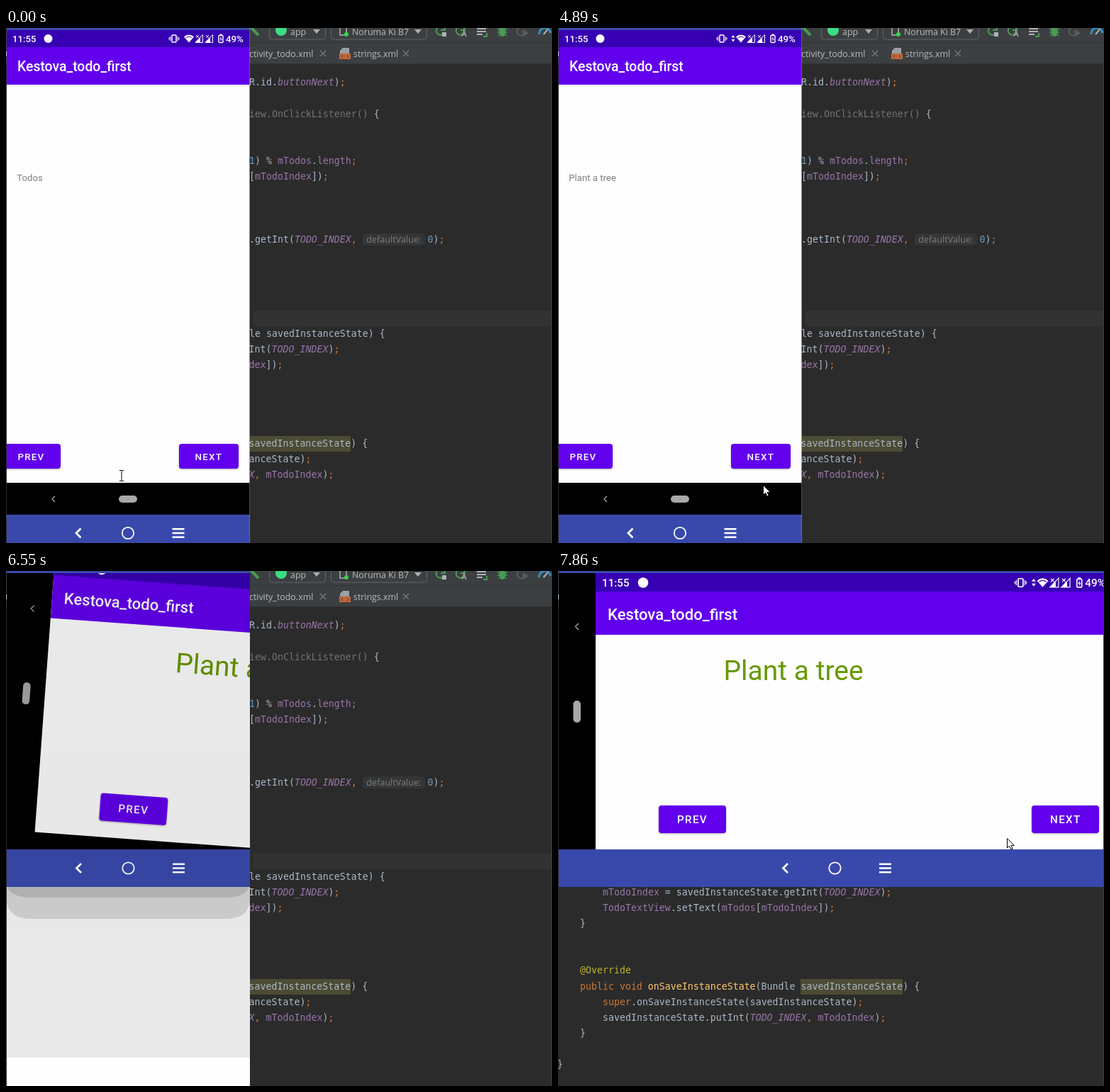
Recreate the animation shown at these times as an HTML page. Size 770 by 727 pixels, loop 8000 ms.

```html
<!DOCTYPE html>
<html lang="en">
<head>
<meta charset="utf-8">
<title>Todo app demo</title>
<style>
html, body { margin: 0; width: 100%; height: 100%; overflow: hidden; background: #2b2b2b; }
svg { display: block; width: 770px; height: 727px; }
text { white-space: pre; }
.code { font: 13.27px "DejaVu Sans Mono", monospace; fill: #a9b7c6; }
.ui { font: 12.4px "Open Sans", sans-serif; fill: #bbb; }
.app { font-family: Roboto, sans-serif; }
.m { font-weight: 500; }
.mono { font: 17.7px "Liberation Mono", monospace; fill: #fff; text-anchor: middle; }
.p { fill: #9876aa; } .o { fill: #cc7832; } .b { fill: #6897bb; } .g { fill: #72737a; }
.y { fill: #ffc66d; } .a { fill: #bbb529; } .c { fill: #9876aa; font-style: italic; }
.btn { fill: #6200ee; filter: drop-shadow(0 1px 1px rgba(0,0,0,.35)); }
</style>
</head>
<body>
<svg id="stage" viewBox="0 0 770 727"></svg>
<script>
const LOOP = 8000;
const INDIGO = '#3949ab', PURPLE = '#6200ee', DARK = '#3700b3', GREEN = '#499c54';

const rect = (x, y, w, h, fill, extra = '') =>
  `<rect x="${x}" y="${y}" width="${w}" height="${h}" fill="${fill}" ${extra}/>`;
const path = (d, stroke, width = 1.5, fill = 'none') =>
  `<path d="${d}" stroke="${stroke}" stroke-width="${width}" fill="${fill}"/>`;
const dot = (x, y, r, fill, extra = '') => `<circle cx="${x}" cy="${y}" r="${r}" fill="${fill}" ${extra}/>`;
const label = (x, y, cls, str, size, fill, extra = '') =>
  `<text x="${x}" y="${y}" class="${cls}" ${size ? `font-size="${size}"` : ''} ${fill ? `fill="${fill}"` : ''} ${extra}>${str}</text>`;

// Code lines: row, column, then text with {class|text} spans.
const lines = [
  [0, 43, 'R.id.{c|buttonNext}){o|;}'],
  [2, 43, '{g|iew.OnClickListener()} {'],
  [5, 43, '{b|1}) % {p|mTodos}.{p|length}{o|;}'],
  [6, 43, '[{p|mTodoIndex}]){o|;}'],
  [10, 43, '.getInt({c|TODO_INDEX}{o|,}'],
  [16, 43, 'le savedInstanceState) {'],
  [17, 8, '{p|mTodoIndex} = savedInstanceState.getInt({c|TODO_INDEX}){o|;}'],
  [18, 8, '{p|TodoTextView}.setText({p|mTodos}[{p|mTodoIndex}]){o|;}'],
  [19, 4, '}'],
  [22, 4, '{a|@Override}'],
  [23, 4, '{o|public void} {y|onSaveInstanceState}(Bundle savedInstanceState) {'],
  [24, 8, '{o|super}.onSaveInstanceState(savedInstanceState){o|;}'],
  [25, 8, 'savedInstanceState.putInt({c|TODO_INDEX}{o|,} {p|mTodoIndex}){o|;}'],
  [26, 4, '}'],
  [28, 0, '}']
];
const spans = s => s.replace(/\{(\w)\|([^}]*)\}/g, '<tspan class="$1">$2</tspan>');
const rowY = r => Math.round(81.3 + r * 22.14);

function toolbar() {
  const caret = x => `<path d="M${x} 2h10l-5 6z" fill="#afb1b3"/>`;
  const cross = x => path(`M${x - 4} 32l8 8m0-8l-8 8`, '#777a7c', 1.2);
  const rerun = x => path(`M${x + 9} 8a6 6 0 1 1 1-7m1-4v6h-6`, GREEN, 2);
  return rect(0, 0, 770, 50, '#3c3f41') + rect(0, 20, 770, 1, '#323435') + rect(0, 50, 770, 1, '#323232') +
    path('M344-2l12 12', GREEN, 4) +
    rect(371.5, -10, 79, 26, 'none', 'rx="4" stroke="#626567"') +
    rect(458.5, -10, 135, 26, 'none', 'rx="4" stroke="#626567"') +
    dot(388, 3, 8, '#3ddc84') +
    label(401, 10, 'ui', 'app') + caret(433) +
    path('M471-3v13h9v-13', '#afb1b3', 1.5) + dot(480, 9, 3, '#32d74b') +
    label(488, 10, 'ui', 'Noruma Ki B7') + caret(576) +
    rerun(608) + rect(615, 6, 6, 6, '#afb1b3') +
    rerun(636) + path('M643 12l3-8 3 8m-5-3h4', '#afb1b3', 1.3) +
    path('M664 1h13M664 5h13M664 9h8', '#afb1b3', 2) + path('M678 7v5h-5', GREEN, 2) +
    path('M693 2h14M693 6h14M694 11l12-10M706 11l-12-10', GREEN, 1.4) +
    `<ellipse cx="700" cy="5" rx="4.5" ry="7" fill="${GREEN}"/>` +
    path('M729-1a6 6 0 1 0 0 11', '#5b5e60', 2) + `<path d="M729 2l8 5-8 5z" fill="#5b5e60"/>` +
    path('M752 9a8 8 0 0 1 16-2', '#3592c4', 3) + path('M758 9l6-7', '#afb1b3', 2) +
    label(343, 41, 'ui', 'ctivity_todo.xml') + cross(447) +
    `<path d="M475 28h9v8h-13v-4z" fill="#9aa0a4"/>` + rect(470, 36, 16, 8, '#c2653a') +
    path('M475 38l-2 2 2 2M481 38l2 2-2 2', '#3c3f41', 1) +
    label(490, 41, 'ui', 'strings.xml') + cross(564);
}

function editor() {
  return rect(0, 0, 770, 727, '#2b2b2b') + toolbar() +
    rect(349, 399, 420, 22, '#323232') +
    rect(342, 576, 144, 22, '#4c4b34') +
    rect(503, 290, 88, 17, '#343536', 'rx="4"') +
    label(508, 303, 'ui', 'defaultValue:', 0, 0, 'style="fill:#7c7e80;font-size:12.7px"') +
    lines.map(([r, c, s]) => label(-1 + c * 8, rowY(r), 'code', spans(s))).join('') +
    label(594.5, rowY(10), 'code', spans('{b|0}){o|;}')) +
    rect(769, 0, 1, 727, '#3c3f41') + rect(0, 33, 1, 7, '#c8c8c8');
}

// Status icons, origin at the centre of the wifi fan.
function statusIcons(x, y, scale, id) {
  const signal = sx => path(`M${sx} 5.5L${sx + 10.5}-5.5V5.5z`, '#fff', 1) +
    `<path d="M${sx} 5.5l7-7.3v7.3z" fill="#fff"/>` + path(`M${sx + 1}-5l4 4m0-4l-4 4`, '#fff', 1);
  return `<g transform="translate(${x} ${y}) scale(${scale})">
    <g id="vib${id}">${rect(-30, -5, 6, 10, 'none', 'stroke="#fff" stroke-width="1.5" rx="1"')}
    ${path('M-32.3-3v6M-21.7-3v6M-34-1.5v3M-20-1.5v3', '#fff', 1.1)}</g>
    <g id="data${id}"><path d="M-13.5-1.5l2.5-3.5 2.5 3.5zM-13.5 1h5l-2.5 3.5z" fill="#fff"/></g>
    <path d="M-7-2.5Q0-8.5 7-2.5L0 5.5z" fill="#fff"/>${path('M-4.5-1Q0-4.5 4.5-1', DARK, 1)}
    ${signal(9)}${signal(23)}
    ${rect(42, -4.5, 6, 10, 'none', 'stroke="#fff" stroke-width="1.4" rx="1"')}${rect(43.5, -6.5, 3, 2, '#fff')}
    ${path('M45.5-2l-1.5 2.7h2.2l-1.4 2.6', '#fff', 1)}
    ${label(52, 5, 'app m', '49%', 13.3, '#fff')}</g>`;
}

const button = (x, y, w, h, str, tx, ty, size) =>
  rect(x, y, w, h, PURPLE, 'class="btn" rx="4"') +
  label(tx, ty, 'app m', str, size, '#fff', `letter-spacing="${size * 0.089}"`);

// Back, home and menu keys around the home circle.
const navKeys = () => path('M-66.5-6.5l-6.5 6.5 6.5 6.5', '#fff', 2.8) +
  dot(0, 0, 8.2, 'none', 'stroke="#fff" stroke-width="1.8"') +
  path('M62.5-5.8h17M62.5 0h17M62.5 5.8h17', '#fff', 2.5);

function portrait() {
  return `<g id="portrait">` + rect(1, 0, 342.5, 727, '#fefefe') +
    rect(1, 3, 342.5, 24, DARK) + rect(1, 27, 342.5, 53, PURPLE) +
    label(9, 20, 'app m', '11:55', 13.2, '#fff') + dot(59.5, 15, 6, '#fff') +
    statusIcons(258, 15, 1, 'P') +
    label(16, 61, 'app m', 'Kestova_todo_first', 19.4, '#fff') +
    label(15.3, 216, 'app', '', 13.2, '#808080', 'id="todo"') +
    `<g clip-path="url(#phone)">` + button(-10, 587, 87, 35, 'PREV', 16.5, 609.5, 13.4) + `</g>` +
    button(244, 587, 84, 35, 'NEXT', 266.5, 609.5, 13.4) +
    `<g clip-path="url(#next)">${dot(282, 608, 0, '#fff', 'id="ripple"')}</g>` +
    rect(1, 642, 342.5, 45, '#000') + path('M69 661l-4 4 4 4', '#aaa', 1.2) +
    rect(159, 660, 26, 10, '#a8a8a8', 'rx="5"') +
    rect(1, 687, 342.5, 40, INDIGO) + `<g transform="translate(172 713)">${navKeys()}</g></g>`;
}

function landscape() {
  return `<g id="landscape">` + rect(1, 3, 343, 724, '#fefefe', 'id="page"') + `<g id="shade"></g>` +
    `<g clip-path="url(#window)">` + rect(0, 3, 770, 390, '#000') + `<g id="screen">` +
    rect(53, 3, 760, 390, '#fefefe') + rect(53, 3, 760, 27, DARK) + rect(53, 29, 760, 61, PURPLE) +
    label(62, 22, 'app m', '11:55', 15.2, '#fff') + dot(120, 16.5, 7.3, '#fff') +
    statusIcons(683.5, 16.5, 1.15, 'L') +
    label(70, 68.5, 'app m', 'Kestova_todo_first', 22.1, '#fff') +
    label(233.5, 153.5, 'app', 'Plant a tree', 39, '#669900') +
    button(142, 331, 95, 39, 'PREV', 168, 356, 15.2) + button(668, 331, 95, 39, 'NEXT', 694, 356, 15.2) +
    path('M29 74l-4.5 4.5 4.5 4.5', '#aaa', 1.3) + rect(21.5, 183, 10.5, 31, '#a8a8a8', 'rx="5"') + `</g></g>` +
    rect(1, 393, 343, 53, INDIGO, 'id="bar"') + `<g id="keys">${navKeys()}</g>` +
    `<g id="dim"><path d="M1 3h343v390h-343zM1 446h343v241h-343z"/>${rect(1, 393, 343, 53, '#000', 'opacity=".6"')}</g>` +
    `<g id="connect">` + rect(1, 3, 343, 390, '#0a0a0a') +
    label(171.5, 337, 'mono', 'Connecting to Quilo on') + label(171.5, 363.5, 'mono', 'Kestova...') + `</g></g>`;
}

const stage = document.getElementById('stage');
stage.innerHTML = `<defs>
  <clipPath id="next"><rect x="244" y="587" width="84" height="35" rx="4"/></clipPath>
  <clipPath id="phone"><rect x="1" y="0" width="342.5" height="727"/></clipPath>
  <clipPath id="window"><rect id="clip" x="1" y="3" width="343" height="390"/></clipPath></defs>` +
  editor() + portrait() + landscape() + rect(1, 0, 343, 3, INDIGO, 'id="strip"') +
  `<g id="beam">${path('M-3-7.5h2.5l.5.5.5-.5h2.5M0-7v14M-3 7.5h2.5l.5-.5.5.5h2.5', '#000', 1)}</g>
  <g id="arrow">${path('M.5.5v13.5l3.2-2.8 2.2 5 2.3-1-2.2-4.8h4.3z', '#000', 1, '#fff')}</g>`;

const $ = id => document.getElementById(id);
const set = (id, attrs) => { for (const k in attrs) $(id).setAttribute(k, attrs[k]); };
const show = (id, on) => set(id, { visibility: on ? 'inherit' : 'hidden' });

// Step tables: [start time, values...]
const cursor = [[0, 163, 632], [150, 238, 674], [290, 290, 652], [430, 286, 622], [580, 283, 609],
  [4020, 270, 612], [4150, 259, 614], [4890, 289, 645], [5040, 305, 663], [5480, 299, 686],
  [5620, 288, 711], [5780, 280, 760], [7290, 330, 686], [7430, 405, 600], [7580, 474, 540],
  [7720, 556, 452], [7860, 633, 377]];
const ripples = [[0, 0, 0], [1130, 27, .13], [1270, 60, .1], [1400, 0, 0],
  [1700, 27, .13], [1850, 60, .13], [2000, 70, .06], [2130, 0, 0],
  [2860, 27, .13], [3000, 60, .13], [3150, 70, .06], [3290, 0, 0]];
const todos = [[0, 'Todos'], [1270, 'Drink Coffee'], [1850, 'Read a book'], [3000, 'Plant a tree']];
// angle, dim, shadow bottom, band count
const turns = [[6100, 90, .265, 500, 6], [6250, 90, .21, 497, 5], [6400, 20, .15, 494, 3],
  [6550, 4.2, .082, 491, 2], [6680, .6, .04, 481, 2], [6830, 0, .005, 472, 2], [6980, 0, 0, 446, 0]];
const at = (table, t) => table.reduce((best, row) => row[0] <= t ? row : best, table[0]);

// Stepped window shadow, darkest right under the bar.
function bands(bottom, count) {
  let out = '';
  for (let i = 0; i <= count && count; i++) {
    const h = (bottom - 446) * (1 - i / count) ** (count > 2 ? 1 : 1.6) + 3;
    const r = Math.min(24, h);
    out += `<path d="M1 446h343v${h - r - 3}q-4 ${r}-34 ${r}h-275q-30 0-34-${r}z" opacity="${count > 2 ? .06 : .13}"/>`;
  }
  return out;
}

function draw(t) {
  const turned = t >= 6100, wide = t >= 6980;
  const width = wide ? 768 : turned ? 343 : 342.5;
  show('portrait', !turned);
  show('landscape', turned);
  set('strip', { width });

  const [, x, y] = at(cursor, t);
  show('beam', t < 150);
  show('arrow', t >= 150);
  set('beam', { transform: `translate(${x} ${y})` });
  set('arrow', { transform: `translate(${x} ${y})` });

  if (!turned) {
    const [, r, alpha] = at(ripples, t);
    set('ripple', { r, opacity: alpha });
    $('todo').textContent = at(todos, t)[1];
    show('dataP', t >= 290);
    set('vibP', { transform: `translate(${t < 290 ? 6 : 0} 0)` });
    return;
  }
  const [, angle, dim, bottom, count] = at(turns, t);
  set('clip', { width });
  set('bar', { width });
  set('keys', { transform: `translate(${wide ? 390.5 : 172.5} 419.5)` });
  set('screen', { transform: `rotate(${angle} 380 212)` });
  set('dim', { opacity: dim });
  $('shade').innerHTML = bands(bottom, count);
  show('page', !wide);
  show('connect', t < 6400);
}

function tick() {
  draw(performance.now() % LOOP);
  requestAnimationFrame(tick);
}
tick();
</script>
</body>
</html>
```
